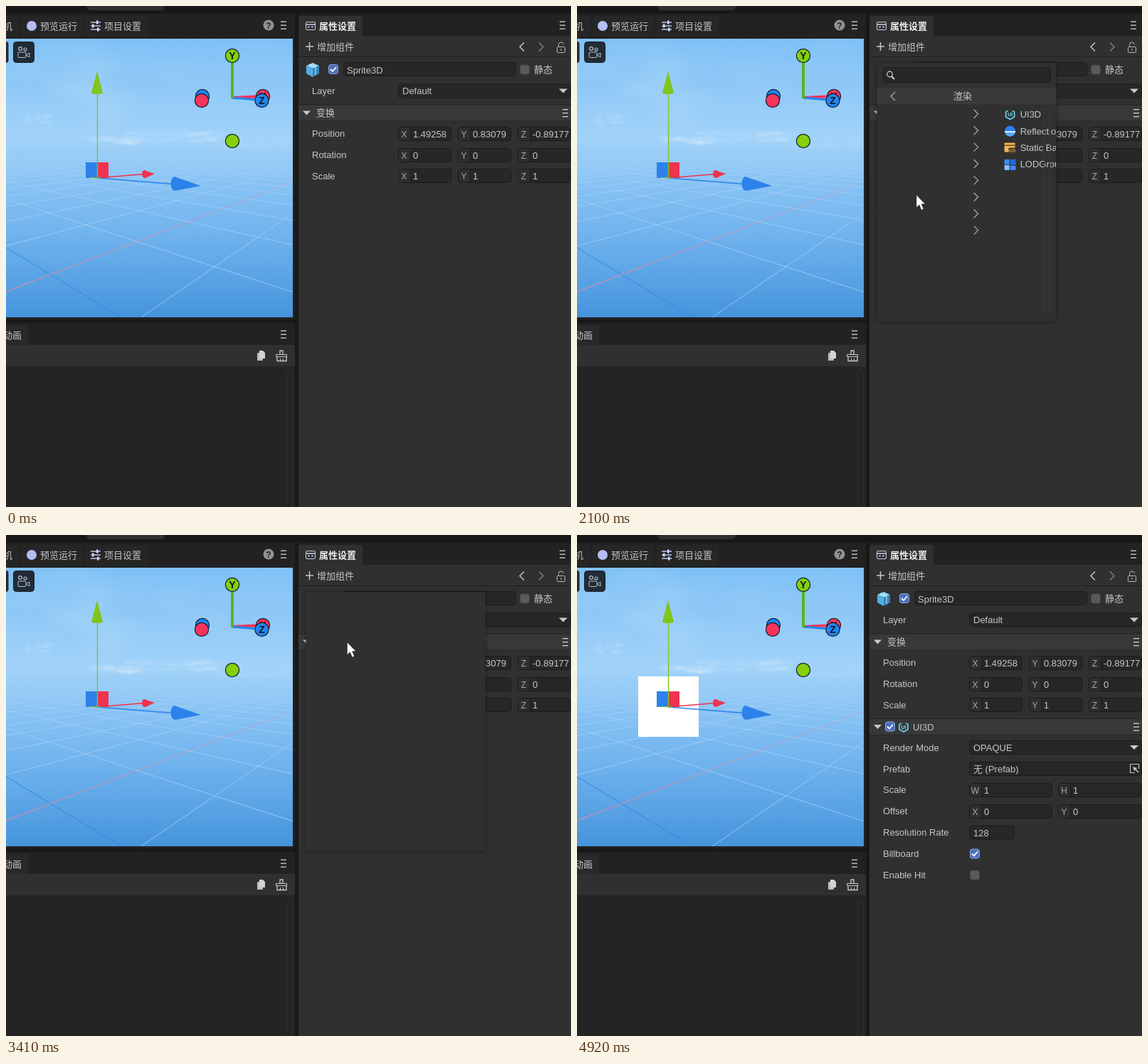
Recreate the animation shown at these times as an HTML page with a canvas. Size 794 px wide and 705 px high, loop 6110 ms.

```html
<!DOCTYPE html>
<html lang="zh-CN">
<head>
<meta charset="utf-8">
<style>
html, body { margin: 0; width: 100%; height: 100%; overflow: hidden; background: #191919; }
canvas { display: block; }
</style>
</head>
<body>
<canvas id="stage" width="794" height="705"></canvas>
<script>
const W = 794, H = 705, LOOP = 6110, TAU = Math.PI * 2;
const FAMILY = '"Liberation Sans","Noto Sans CJK SC",sans-serif';
const TEXT = '#c6c6c6', PANEL = '#303030', DARK = '#1b1b1b';
const stage = document.getElementById('stage').getContext('2d');
let g = stage;

// Drawing helpers; all paint into the current context g.
function layer(paint) {
  const c = document.createElement('canvas');
  c.width = W; c.height = H;
  const old = g;
  g = c.getContext('2d');
  paint();
  g = old;
  return c;
}
function rect(x, y, w, h, fill) { g.fillStyle = fill; g.fillRect(x, y, w, h); }
function round(x, y, w, h, r, fill, stroke) {
  g.beginPath();
  g.roundRect(x, y, w, h, r);
  if (fill) { g.fillStyle = fill; g.fill(); }
  if (stroke) { g.strokeStyle = stroke; g.lineWidth = 1; g.stroke(); }
}
function path(pts, close) {
  g.beginPath();
  for (let i = 0; i < pts.length; i += 2) g.lineTo(pts[i], pts[i + 1]);
  if (close) g.closePath();
}
function line(pts, color, width = 1) {
  path(pts);
  g.strokeStyle = color; g.lineWidth = width; g.stroke();
}
function poly(pts, fill) { path(pts, true); g.fillStyle = fill; g.fill(); }
function disc(x, y, r, fill, stroke) {
  g.beginPath();
  g.arc(x, y, r, 0, TAU);
  if (fill) { g.fillStyle = fill; g.fill(); }
  if (stroke) { g.strokeStyle = stroke; g.lineWidth = 1.2; g.stroke(); }
}
function oval(x, y, rx, ry, fill) {
  g.beginPath();
  g.ellipse(x, y, rx, ry, 0, 0, TAU);
  g.fillStyle = fill; g.fill();
}
function text(s, x, y, { color = TEXT, font = '13px', align = 'left' } = {}) {
  g.font = font + ' ' + FAMILY;
  g.textAlign = align;
  g.fillStyle = color;
  g.fillText(s, x, Math.round(y + 4.6));
}

// Interface parts, positioned by their centre line.
function bars(x, y) { for (const d of [-5, 0, 5]) rect(x - 4, y + d - .5, 8, 1.3, '#cfcfcf'); }
function chevron(x, y, dir, color = '#a8a8a8', s = 6) {
  line([x - dir * s / 2, y - s, x + dir * s / 2, y, x - dir * s / 2, y + s], color, 1.3);
}
function field(x, y, w) { round(x + .5, y - 9.5, w - 1, 19, 4, '#272727', DARK); }
function tagged(x, y, w, tag, value) {
  field(x, y, w);
  round(x + 1, y - 9, 16, 18, [4, 0, 0, 4], '#2e2e2e');
  line([x + 17.5, y - 9, x + 17.5, y + 9], DARK);
  text(tag, x + 8.5, y, { color: '#a8a8a8', font: '12px', align: 'center' });
  text(value, x + 21, y + .7);
}
function select(y, value) {
  field(551, y, 243);
  text(value, 557, y);
  poly([777, y - 3, 789, y - 3, 783, y + 3], '#c8c8c8');
}
function check(x, y, on) {
  round(x - 6.5, y - 6.5, 13, 13, 3, on ? '#4b70bd' : '#5a5a5a', on ? '#8ea6d8' : '#444');
  if (on) line([x - 4, y, x - 1, y + 3, x + 4, y - 3], '#fff', 1.8);
}
function section(y) {
  rect(411, y - 11.5, 383, 23, '#383838');
  line([411, y - 11.5, W, y - 11.5], '#222');
  line([411, y + 11.5, W, y + 11.5], '#272727');
  poly([417, y - 3, 428, y - 3, 422.5, y + 3], '#c8c8c8');
  bars(786, y);
}
function label(s, y) { text(s, 430, y); }
function hexIcon(x, y) {
  path([x - 3, y - 5, x - 6, y - 3.5, x - 6, y + 3.5, x, y + 7, x + 6, y + 3.5, x + 6, y - 3.5, x + 3, y - 5]);
  g.strokeStyle = '#65d3f4'; g.lineWidth = 1.7; g.stroke();
  text('UI', x, y - 2, { color: '#7de0fa', font: 'bold 7px', align: 'center' });
}

function paintScene() {
  g.save();
  g.beginPath(); g.rect(0, 46, 403, 392); g.clip();
  const sky = g.createLinearGradient(0, 46, 0, 438);
  [[0, '#7fc1f6'], [.18, '#90c9f7'], [.36, '#a2d3f9'], [.44, '#94caf6'], [.55, '#84c0f3'],
    [.73, '#6cb0ec'], [.9, '#549fe2'], [1, '#4594dc']].forEach(s => sky.addColorStop(...s));
  rect(0, 46, 403, 392, sky);

  let seed = 7;
  const rnd = () => (seed = seed * 16807 % 2147483647) / 2147483647;
  const cloud = (n, x, y, w, h, size, color) => {
    for (let i = 0; i < n; i++)
      oval(x + (rnd() - .5) * w, y + (rnd() - .5) * h, size * (.5 + rnd()), size * (.15 + rnd() * .2), color);
  };
  g.filter = 'blur(10px)';
  cloud(10, 50, 110, 220, 110, 45, 'rgba(205,232,252,.12)');
  cloud(8, 200, 90, 380, 70, 50, 'rgba(190,225,252,.08)');
  g.filter = 'blur(1.5px)';
  cloud(18, 44, 158, 36, 14, 6, 'rgba(215,238,253,.2)');
  cloud(36, 150, 189, 80, 9, 7, 'rgba(220,240,253,.2)');
  cloud(44, 235, 184, 130, 14, 8, 'rgba(215,238,253,.17)');
  cloud(16, 350, 196, 110, 10, 9, 'rgba(215,238,253,.1)');
  g.filter = 'none';

  // Ground grid: two families of lines, each running to its own vanishing point.
  const horizon = 192;
  const fade = (rgb, a) => {
    const f = g.createLinearGradient(0, 208, 0, 400);
    f.addColorStop(0, `rgba(${rgb},0)`);
    f.addColorStop(.3, `rgba(${rgb},${a * .5})`);
    f.addColorStop(1, `rgba(${rgb},${a})`);
    return f;
  };
  const white = fade('225,240,255', .5);
  for (let i = -14; i < 3; i++)
    line([548, horizon, -94 + 284 * i, 438], i ? white : fade('240,135,160', 1));
  for (let i = 0; i < 16; i++)
    line([-245, horizon, 162 + 350 * i, 438], i ? white : '#2f87e6');
  g.restore();
}

function paintGizmos() {
  const green = '#80c41c', red = '#f0334f', blue = '#2c82ea';
  rect(112, 220, 16, 22, blue);
  rect(128, 220, 16, 22, red);
  line([128, 242, 194, 236.5], red, 1.3);
  poly([193, 231, 209, 236, 196, 242], red);
  oval(195, 236.5, 4, 5.5, red);
  line([128, 242, 234, 250.5], blue, 1.6);
  poly([236, 240, 274, 253, 238, 260], blue);
  oval(237, 250, 5.5, 10, blue);
  line([128.5, 242, 128.5, 120], green, 1.4);
  line([118, 241.5, 134, 242], green, 1);
  poly([128, 92, 120, 122, 136, 122], green);
  oval(128, 122, 8, 2, green);

  const ball = (x, y, color, s) => {
    disc(x, y, 9.6, color, '#152030');
    if (s) text(s, x, y + .4, { color: '#101820', font: 'bold 14px', align: 'center' });
  };
  const lime = '#84d00c', azure = '#1f86f2', rose = '#f8345c';
  ball(276, 127, azure);
  ball(275, 133, rose);
  ball(318, 190, lime);
  line([318, 129, 361, 127], rose, 4);
  ball(361, 127, rose, 'X');
  line([318, 129, 352, 132], azure, 3);
  ball(359.5, 133, azure, 'Z');
  line([318, 130, 318, 78], '#58b51c', 4);
  ball(318, 70, lime, 'Y');

  round(10.5, 50.5, 29, 29, 4, '#212c36', '#17212a');
  round(-10, 50, 13.5, 30, 4, '#212c36');
  const ink = '#b5bdc4';
  disc(20, 60, 2.4, null, ink);
  disc(27, 61, 2, null, ink);
  round(17, 65, 11, 7.5, 1, null, ink);
  line([28, 69, 33, 66, 33, 72, 28, 69], ink);
}

function paintFrame() {
  rect(0, 0, W, H, '#181818');
  round(113, -10, 110, 16, 5, '#303030');

  // Scene panel
  rect(0, 11, 406, 430, '#222');
  for (const [x, w] of [[-20, 39], [22, 87], [111, 88]]) round(x, 14, w, 29, 4, '#262626');
  text('机', -4, 28);
  disc(36, 28, 7, '#b4bef4');
  text('预览运行', 48, 28);
  for (const [y, x] of [[23, 128], [28, 122], [33, 129]]) {
    line([119, y, 133, y], '#b9c3ef', 1.5);
    rect(x - 1, y - 2.5, 2.5, 5, '#d5dcff');
  }
  text('项目设置', 138, 28);
  disc(369, 27, 7.5, '#929292');
  text('?', 369, 27, { color: '#222', font: 'bold 12px', align: 'center' });
  bars(390, 27);

  // Timeline panel
  rect(0, 446, 406, 259, '#222');
  round(-10, 449, 41, 30, 4, '#292929');
  text('动画', -4, 463);
  bars(390, 462);
  rect(0, 477, 406, 30, '#303030');
  rect(0, 507, 406, 198, '#242424');
  round(394.5, 512.5, 8, 210, 4, null, '#303030');
  round(353, 488, 8, 11, 1, '#bdbdbd');
  poly([356, 485, 361, 485, 364, 488, 364, 496, 356, 496], '#d4d4d4');
  line([385, 491, 385, 485, 389, 485, 389, 491], '#c8c8c8', 1.3);
  round(379.5, 490.5, 15, 3, 0, null, '#c8c8c8');
  line([381, 493, 381, 499.5, 394, 499.5, 394, 493], '#c8c8c8', 1.3);
  line([385.5, 496, 385.5, 500], '#c8c8c8');
  line([389.5, 496, 389.5, 500], '#c8c8c8');

  // Inspector panel
  rect(411, 11, 383, 31, '#222');
  rect(411, 42, 383, 663, PANEL);
  round(411, 14, 90, 30, [4, 4, 0, 0], PANEL);
  round(421.5, 22.5, 13, 11, 1.5, null, '#c8d0ee');
  line([422, 26, 434, 26], '#c8d0ee', 1.5);
  line([424, 29.5, 427, 29.5], '#c8d0ee', 1.5);
  line([429, 29.5, 432, 29.5], '#c8d0ee', 1.5);
  text('属性设置', 440, 28, { color: '#eee', font: 'bold 13px' });
  bars(782, 27);
  line([411, 71.5, W, 71.5], '#1f1f1f');
  chevron(725, 57.5, -1, '#d2d2d2');
  chevron(752, 57.5, 1, '#858585');
  round(774.5, 57.5, 11, 8, 1, null, '#bbb');
  g.beginPath(); g.arc(780, 54.5, 3.5, Math.PI, TAU - .2);
  g.strokeStyle = '#bbb'; g.stroke();
  line([776.5, 54.5, 776.5, 57], '#bbb');
  line([780, 60, 780, 63], '#bbb');

  poly([431, 80, 440, 84, 431, 88, 422, 84], '#92daf7');
  poly([422, 84, 431, 88, 431, 100, 422, 95], '#52b0e0');
  poly([440, 84, 431, 88, 431, 100, 440, 95], '#3487ba');
  line([426, 82, 435, 86, 435, 97], '#d0effc', 1);
  check(460, 89, true);
  field(474, 89, 243);
  text('Sprite3D', 479, 90);
  check(729, 89.5, false);
  text('静态', 742, 89);
  label('Layer', 119.5);
  select(119.5, 'Default');
  section(150.5);
  text('变换', 436, 150.5);
  const rows = [['Position', '1.49258', '0.83079', '-0.89177'], ['Rotation', '0', '0', '0'], ['Scale', '1', '1', '1']];
  rows.forEach(([name, ...values], i) => {
    const y = 179.8 + 29.8 * i;
    label(name, y - .3);
    values.forEach((v, k) => tagged(551 + 84 * k, Math.round(y), 75, 'XYZ'[k], v));
  });
}

function paintComponent() {
  section(270);
  check(440, 269.5, true);
  hexIcon(459, 270);
  text('UI3D', 472, 270);
  label('Render Mode', 299);
  select(299, 'OPAQUE');
  label('Prefab', 329);
  field(551, 329, 243);
  text('无 (Prefab)', 557, 329);
  line([784, 334.5, 777.5, 334.5, 777.5, 322.5, 789.5, 322.5, 789.5, 329], '#bbb', 1.2);
  poly([781, 326, 787, 328, 783, 332], '#c8c8c8');
  line([784, 329, 789, 334], '#c8c8c8', 1.5);
  label('Scale', 358.5);
  tagged(551, 359, 117, 'W', '1');
  tagged(676, 359, 117, 'H', '1');
  label('Offset', 388.5);
  tagged(551, 389, 117, 'X', '0');
  tagged(676, 389, 117, 'Y', '0');
  label('Resolution Rate', 418);
  field(551, 418.5, 64);
  text('128', 557, 419);
  label('Billboard', 448);
  check(559, 448.5, true);
  label('Enable Hit', 478);
  check(559, 478.5, false);
}

const GROUPS = ['动画', '物理', '网格', '特效', '灯光', '渲染', '脚本组件', '新建脚本'];
const RENDERERS = ['UI3D', 'Reflection Probe', 'Static Batch Volume', 'LODGroup'];
const rowY = i => 152.6 + 23.4 * i;

const icons = [
  y => hexIcon(438, y),
  y => {
    disc(438, y, 7.5, '#2a7df0');
    g.beginPath(); g.arc(438, y, 7.5, 0, Math.PI); g.fillStyle = '#5aa8ff'; g.fill();
    rect(430.5, y, 15, 1.8, '#e4f1ff');
  },
  y => {
    round(430, y - 7, 15, 13, 1, '#f0b455');
    rect(430, y - 4, 15, 1.5, '#6b4a1c');
    round(436, y, 10, 8, 1, '#4a3a22');
    text('</>', 441, y + 2, { color: '#f5cf8d', font: '7px', align: 'center' });
  },
  y => {
    rect(430, y - 7, 7, 7, '#3b8cff');
    rect(438, y - 7, 8, 8, '#2166d8');
    rect(430, y + 1, 7, 7, '#8fc0ff');
    rect(438, y + 2, 8, 6, '#3b8cff');
  }
];

function paintList(names, hover, sub) {
  if (names[hover]) rect(428, rowY(hover) - 12, 227.5, 24, '#373b42');
  names.forEach((name, i) => {
    const y = rowY(i);
    text(name, 452, sub ? y : y - .8);
    if (sub) icons[i](y); else chevron(642, y - .8, 1);
  });
}

function paintMenu(s, hover) {
  g.shadowColor = 'rgba(0,0,0,.45)'; g.shadowBlur = 5;
  round(421.5, 80, 252, 364, 2, PANEL);
  g.shadowBlur = 0;
  if (s >= 3410) return;
  round(430.5, 86.5, 235, 21, 4, '#272727', DARK);
  disc(439.5, 96, 3.8, null, '#ddd');
  line([442, 99, 446, 103], '#ddd', 1.8);
  rect(421.5, 115, 252, 23.5, '#393939');
  const slide = clamp((s - 2030) / 250);
  const sub = slide > 0;
  text(sub ? '渲染' : '组件列表', 542, 126.5, { align: 'center' });
  if (sub) chevron(444, 127, -1);
  g.save();
  g.beginPath(); g.rect(422, 139, 251, 304); g.clip();
  const shift = 252 * (1 - slide) ** 2;
  if (slide < 1) {
    g.save(); g.translate(sub ? shift - 252 : 0, 0);
    paintList(GROUPS, sub ? -1 : hover, false);
    g.restore();
  }
  if (sub) {
    g.translate(shift, 0);
    paintList(RENDERERS, hover, true);
    g.translate(-shift, 0);
  }
  round(656.5, 144.5, 8, 290, 4, null, '#3a3a3a');
  g.restore();
}

// Time, x, y, and whether the move to this point eases.
const PATH = [[190, 784, 449], [740, 466, 49, 1], [1090, 466, 49], [1430, 463, 222, 1], [1500, 462, 234],
  [1710, 477, 266], [2100, 477, 266], [2510, 492, 209], [2930, 479.5, 151], [3440, 479.5, 151],
  [4020, 610, 465, 1], [4080, 610, 466], [4150, 613, 474], [4640, 657, 578], [4850, 719, 692], [4920, 742, 730]];
// Spans in which the picture moves: start, end, steps.
const MOVES = [[190, 740, 9], [830, 1430, 9], [1500, 1710, 4], [1900, 2510, 8], [2580, 2930, 6],
  [3260, 3260, 1], [3410, 4020, 10], [4080, 4640, 9], [4710, 4920, 4]];
const CLICKS = [[830, 1090], [1900, 2040], [3260, 3410]];

function clamp(v) { return Math.min(1, Math.max(0, v)); }
function snap(t) {
  let out = 0;
  for (const [a, b, n] of MOVES) {
    if (t < a) break;
    const step = (b - a) / (n - 1);
    out = t >= b ? b : a + Math.floor((t - a) / step) * step;
  }
  return out;
}
function pointer(t) {
  const i = PATH.findIndex(k => k[0] > t);
  if (i < 1) return null;
  const [ta, xa, ya] = PATH[i - 1], [tb, xb, yb, ease] = PATH[i];
  let p = (t - ta) / (tb - ta);
  if (ease) p = p * p * (3 - 2 * p);
  return { x: xa + (xb - xa) * p, y: ya + (yb - ya) * p };
}
function paintPointer({ x, y }) {
  const pts = [0, 0, 0, 17.5, 4, 13.8, 7, 21, 10, 19.6, 7, 12.8, 12, 12.5];
  path(pts.map((v, i) => v + (i % 2 ? y : x)), true);
  g.fillStyle = '#fff'; g.fill();
  g.strokeStyle = 'rgba(0,0,0,.6)'; g.lineWidth = .6; g.stroke();
}

const frame = layer(() => { paintFrame(); paintScene(); });
const gizmos = layer(paintGizmos);

function draw(now) {
  const s = snap(now % LOOP);
  const at = pointer(s), before = pointer(s - 70);
  g.drawImage(frame, 0, 0);
  if (s >= 3670) rect(86, 199, 85, 85, '#fff');
  g.drawImage(gizmos, 0, 0);
  if (s >= 3600) paintComponent();

  if (at && at.x < 494 && at.y > 46 && at.y < 69) round(415.5, 46.5, 78, 23, 4, '#3d3d3d', '#565656');
  line([421, 57, 432, 57], '#c8c8c8', 1.5);
  line([426.5, 51, 426.5, 63], '#c8c8c8', 1.5);
  text('增加组件', 437, 57);

  const open = s < 3410 ? clamp((s - 1290) / 240) : clamp(1 - (s - 3410) / 240);
  if (open) {
    const hover = before ? Math.round((before.y - 152.6) / 23.4) : -1;
    const menu = layer(() => paintMenu(s, hover));
    const k = .94 + .06 * open;
    g.save();
    g.globalAlpha = open;
    g.translate(547.5, 262); g.scale(k, k); g.translate(-547.5, -262);
    g.drawImage(menu, 0, 0);
    g.restore();
  }
  if (at) {
    if (CLICKS.some(([a, b]) => s >= a && s < b)) disc(at.x, at.y, 13, 'rgba(226,214,20,.72)');
    paintPointer(at);
  }
}
const start = performance.now();
function tick() {
  draw(performance.now() - start);
  requestAnimationFrame(tick);
}
tick();
</script>
</body>
</html>
```
